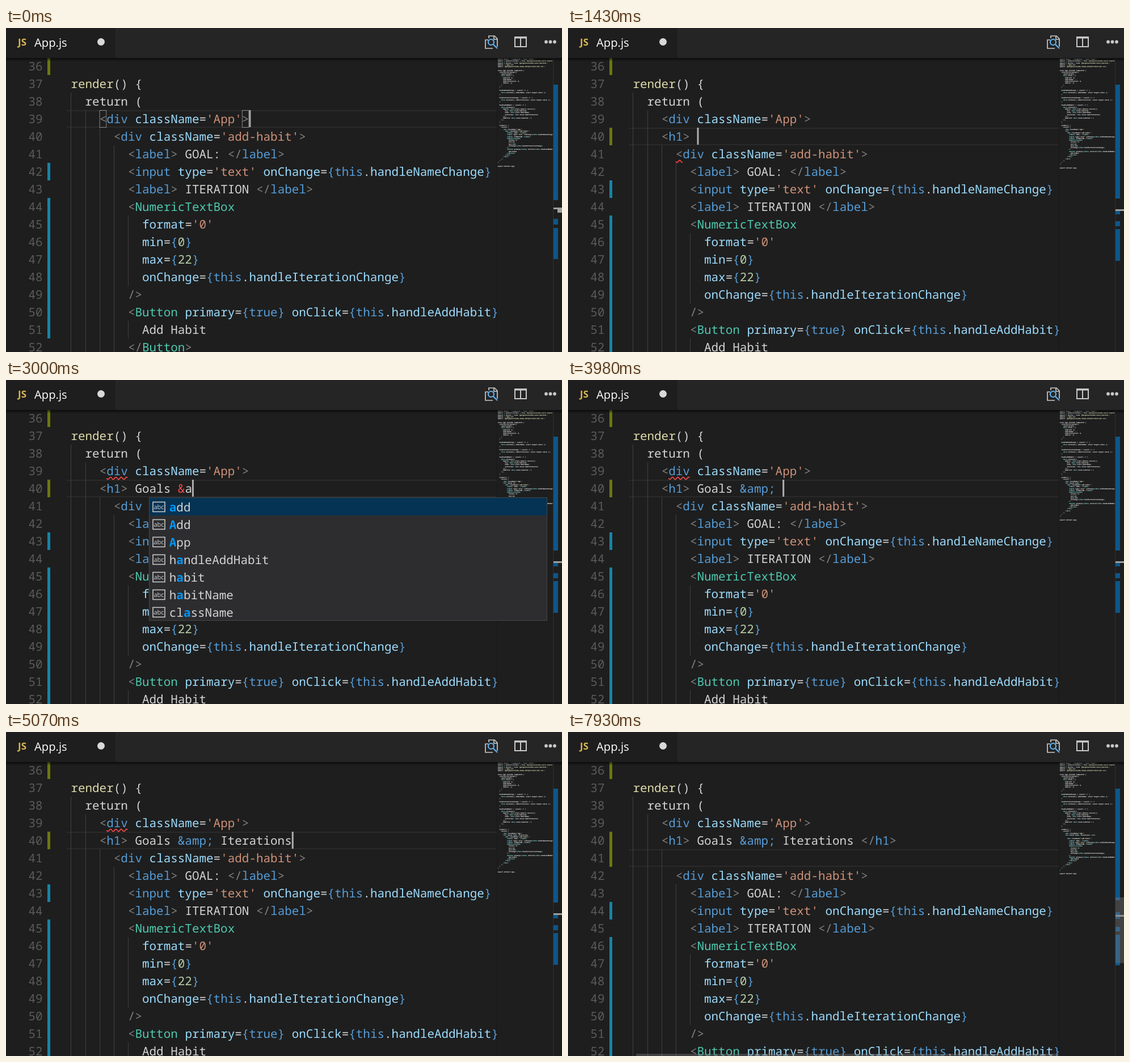
An HTML page that plays this animation: 980x572 px, repeating every 8000 ms.

```html
<!DOCTYPE html>
<html lang="en">
<head>
<meta charset="utf-8">
<title>App.js</title>
<style>
  html, body { margin: 0; width: 100%; height: 100%; overflow: hidden; background: #1e1e1e; }
  svg { display: block; width: 980px; height: 572px; }
  text { text-rendering: geometricPrecision; white-space: pre; }
  .mono { font-family: "Noto Sans Mono", monospace; }
  .ui { font-family: "Open Sans", sans-serif; }
  #map { filter: brightness(1.8); }
</style>
</head>
<body>
<svg viewBox="0 0 980 572">
  <defs>
    <clipPath id="codeClip"><rect x="107" y="53" width="759" height="519"/></clipPath>
    <clipPath id="mapClip"><rect x="866" y="53" width="98" height="519"/></clipPath>
    <linearGradient id="shade" x2="0" y2="1">
      <stop stop-color="#000" stop-opacity=".6"/><stop offset="1" stop-color="#000" stop-opacity="0"/>
    </linearGradient>
  </defs>
  <rect width="980" height="572" fill="#1e1e1e"/>
  <g id="gutter" class="mono"></g>
  <g id="code" class="mono" clip-path="url(#codeClip)"></g>
  <g id="map" class="mono" clip-path="url(#mapClip)" font-weight="800"></g>
  <g id="ruler"></g>
  <g id="popup" class="mono"></g>
  <g id="header">
    <rect width="980" height="53" fill="#252526"/>
    <rect width="193" height="53" fill="#1e1e1e"/>
    <rect y="53" width="980" height="6" fill="url(#shade)"/>
    <text class="ui" x="21" y="30.5" font-size="17" font-weight="700" fill="#d8b650">JS</text>
    <text class="ui" x="50" y="33" font-size="20.2" fill="#fff">App.js</text>
    <circle cx="167.5" cy="24.5" r="6.5" fill="#d8d8d8"/>
    <g fill="none" stroke="#c8c8c8" stroke-width="1.7">
      <path d="M851 18V14H861L866 19V33M850 21H845V36H858M860 14V20H866"/>
      <g stroke="#5fb4ee" stroke-width="2.2"><circle cx="855" cy="25" r="5"/><path d="M859 29L866 36"/></g>
      <path d="M897 16H917V33H897ZM907 16V33M896 17.5H918" stroke-width="2"/>
    </g>
    <g fill="#c8c8c8"><circle cx="952" cy="24.5" r="2.9"/><circle cx="959.5" cy="24.5" r="2.9"/><circle cx="967" cy="24.5" r="2.9"/></g>
  </g>
</svg>
<script>
const LOOP = 8000, LEFT = 89.3, ADV = 12.56, SIZE = ADV / 0.6, ROW = 31, TOP = 52, FIRST = 36;
const $ = id => document.getElementById(id);
const colX = c => LEFT + c * ADV;
const rowY = r => TOP + r * ROW;
const esc = s => s.replace(/&/g, '&amp;').replace(/</g, '&lt;');
const rect = (x, y, w, h, fill, more = '') =>
  `<rect x="${x}" y="${y}" width="${w}" height="${h}" fill="${fill}" ${more}/>`;

const FILE = `import React, { Component } from 'react';
import { NumericTextBox } from '@progress/kendo-react-inputs';
import { Button } from '@progress/kendo-react-buttons';
import './App.css'
import '@progress/kendo-theme-default/dist/all.css';

class App extends Component {
  constructor(props){
    super(props);
    this.state = {
      habitId: 0,
      habitName: '',
      habitIteration: 0,
      habits: []
    }
  }

  handleNameChange = (event) => {
    this.setState({ habitName: event.target.value });
  }

  handleIterationChange = (event) => {
    this.setState({ habitIteration: event.target.value });
  }

  handleAddHabit = (event) => {
    this.setState({
      habits: this.state.habits.concat([{
        key: this.state.habitId,
        name: this.state.habitName,
        iteration: this.state.habitIteration
      }]),
      habitId: this.state.habitId + 1
    });
  }

  render() {
    return (
      <div className='App'>
        <div className='add-habit'>
          <label> GOAL: </label>
          <input type='text' onChange={this.handleNameChange} />
          <label> ITERATION </label>
          <NumericTextBox
            format='0'
            min={0}
            max={22}
            onChange={this.handleIterationChange}
          />
          <Button primary={true} onClick={this.handleAddHabit}>
            Add Habit
          </Button>
        </div>
      </div>
    );
  }
}

export default App;`.split('\n');

// Syntax colours, first match wins
const RULES = [
  [/'[^']*'/, '#ce9178'],
  [/<\/\w*$/, '#d4d4d4'],
  [/(?<=<\/?)[a-z]\w*/, '#569cd6'],
  [/(?<=<\/?)[A-Z]\w*/, '#4ec9b0'],
  [/<\/?|\/?>/, '#808080'],
  [/\w+(?==['{])|(?<=this\.)\w+/, '#9cdcfe'],
  [/\{$/, '#d4d4d4'],
  [/\bthis\b|\btrue\b|&amp;|[{}]/, '#569cd6'],
  [/&/, '#f44747'],
  [/\b\d+/, '#b5cea8'],
  [/\w+(?=\()/, '#dcdcaa'],
  [/\w+|\S/, '#d4d4d4']
];
const LEXER = new RegExp(RULES.map(r => `(${r[0].source})`).join('|'), 'g');

function paint(line, x, y, adv) {
  const spans = [...line.matchAll(LEXER)].map(m => {
    const rule = m.slice(1).findIndex(Boolean);
    return `<tspan x="${(x + m.index * adv).toFixed(2)}" fill="${RULES[rule][1]}">${esc(m[0])}</tspan>`;
  });
  return `<text y="${y}" font-size="${adv / 0.6}">${spans.join('')}</text>`;
}

function squiggle([row, from, to]) {
  const x0 = colX(from), x1 = colX(to), y = rowY(row) + 28.5;
  let d = '';
  for (let x = x0; x <= x1; x++)
    d += `${d ? 'L' : 'M'}${x.toFixed(1)} ${(y + 2 * Math.sin((x - x0) * Math.PI / 4.7)).toFixed(1)}`;
  return `<path d="${d}" fill="none" stroke="#f44747" stroke-width="1.7"/>`;
}

// Suggestion lists: query, items, icon
const list = (query, items, icon = 'abc') => ({ query, items: items.split(','), icon });
const TAGS = list('h', 'h,h1,h2,h3,h4,h5,h6,handleAddHabit,handleIterationChange,handleNameChange,head,header,hr', 'cube');
const ITE = 'iteration,ITERATION,habitIteration,handleIterationChange';
const special = { 'h': 'page', 'import statement': 'snip' };

const ICONS = {
  cube: `<path d="M-11 -4L0 -9L11 -5V4L-1 9L-11 5Z" fill="#75beff"/><path d="M-8 -3.5L0 -6.8L8 -4.2L-1 -.6Z" fill="#2d2d30"/>`,
  page: `<path d="M-7 -10H2L8 -4V10H-7ZM2 -10V-4H8" fill="none" stroke="#c8c8c8" stroke-width="1.8"/>`,
  abc: `<rect x="-10" y="-8.5" width="21" height="17" fill="none" stroke="#c8c8c8" stroke-width="1.6"/>
    <text x=".5" y="4" font-size="11" text-anchor="middle" fill="#d4d4d4" class="ui">abc</text>`,
  snip: `<path d="M-8 8V-9H9V8" fill="none" stroke="#c8c8c8" stroke-width="2"/><path d="M-9 10H10" stroke="#c8c8c8" stroke-width="2" stroke-dasharray="2.5 2.2"/>`
};

function hits(label, query) {
  const low = label.toLowerCase(), q = query.toLowerCase(), at = low.indexOf(q);
  const start = at < 0 ? low.indexOf(q.slice(1), 1) : at;
  return [...label].map((_, i) =>
    at < 0 ? i === 0 || (i >= start && i < start + q.length - 1) : i >= at && i < at + q.length);
}

function drawPopup(pop, cursor) {
  if (!pop) return '';
  const x = Math.min(Math.round(colX(cursor)), 252), y = 207, h = pop.items.length * ROW + 1;
  let out = rect(x + .5, y + .5, 701, h - 1, '#2d2d30', 'stroke="#454545"');
  out += rect(x + 1, y + 1, 700, ROW, '#053354');
  pop.items.forEach((label, i) => {
    const mid = y + 17 + i * ROW, hit = hits(label, pop.query);
    const spans = [...label].map((c, k) =>
      `<tspan x="${(x + 35.8 + k * ADV).toFixed(2)}" ${hit[k] ? 'fill="#0097fb" font-weight="700"' : ''}>${c}</tspan>`);
    out += `<g transform="translate(${x + 17} ${mid})">${ICONS[special[label] || pop.icon]}</g>`;
    out += `<text y="${mid + 7.5}" font-size="${SIZE}" fill="#d4d4d4">${spans.join('')}</text>`;
  });
  if (pop.items.length > 11) out += rect(x + 684, y + 1, 17, 37, '#797979', 'opacity=".4"');
  return out;
}

// Steps: time, typed line, extras (bars is the scrollbar opacity)
const H = '      ', BLANK = H + '  ';
const OPEN = [[5, 8, 9]], DIV = [[3, 7, 10]];
const G = H + '<h1> Goals', A = G + ' &amp;', I = A + ' Iterations';
const END = I + ' </h1>';
const STEPS = [
  [0, null, {}],
  [150, BLANK, { bars: .4 }],
  [300, H, { bars: .4 }],
  [460, H + '<', { bars: .4 }],
  [610, H + '<h', { bars: .3 }],
  [770, H + '<h', { bars: .2, pop: TAGS, wavy: OPEN }],
  [920, H + '<h1', { bars: .14, pop: TAGS, wavy: OPEN }],
  [1070, H + '<h1', { bars: .06, pop: list('h1', 'h1', 'cube'), wavy: OPEN }],
  [1260, H + '<h1>', { wavy: OPEN }],
  [1420, H + '<h1> ', { wavy: OPEN }],
  [1580, H + '<h1> G', { wavy: OPEN, pop: list('G', 'GOAL,target,getChildContext,global,change,handleNameChange,handleIterationChange,onChange,progress,getElement,getValue,group') }],
  [1730, H + '<h1> Go', { wavy: OPEN, pop: list('Go', 'GOAL') }],
  [1890, H + '<h1> Goal', { wavy: OPEN, pop: list('Goal', 'GOAL') }],
  [2210, G, { wavy: OPEN }],
  [2370, G + ' ', { wavy: DIV }],
  [2520, G + ' &', { wavy: DIV }],
  [3000, G + ' &a', { wavy: DIV, pop: list('a', 'add,Add,App,handleAddHabit,habit,habitName,className') }],
  [3180, G + ' &am', { wavy: DIV, pop: list('am', 'name,habitName,className,handleNameChange') }],
  [3360, G + ' &amp', { wavy: DIV }],
  [3690, A, { wavy: DIV }],
  [3980, A + ' ', { wavy: DIV }],
  [4150, A + ' I', { wavy: DIV, pop: list('I', 'iteration,ITERATION,import,import statement,input,if,ifelse,Id,habitId,habitIteration,handleIterationChange') }],
  [4300, A + ' It', { wavy: DIV, pop: list('It', ITE + ',habit,habits,import statement') }],
  [4440, A + ' Ite', { wavy: DIV, pop: list('Ite', ITE + ',import statement') }],
  [4600, A + ' Iter', { wavy: DIV, pop: list('Iter', ITE) }],
  [4750, A + ' Iterat', { wavy: DIV, pop: list('Iterat', ITE) }],
  [4910, A + ' Iteratio', { wavy: DIV, pop: list('Iteratio', ITE) }],
  [5070, I, { wavy: DIV }],
  [5550, I + ' ', { wavy: DIV }],
  [5860, I + ' <', { wavy: DIV }],
  [6030, I + ' </', { wavy: DIV }],
  [6340, I + ' </h', { wavy: [[5, 1.4, 9], [4, 34, 37]], pop: list('h', 'h1') }],
  [6500, I + ' </h1', { wavy: [[5, 1.4, 9], [4, 34, 38]], pop: list('h1', 'h1') }],
  [6810, I + ' </h1', { wavy: OPEN, pop: list('h1', 'h1') }],
  [6950, I + ' </h1', { wavy: OPEN, pop: list('h1', 'h1'), blink: 1 }],
  [7300, END, {}],
  [7460, END, { extra: 1, bars: .4 }],
  [7930, END, { extra: 1, bars: .4, blink: 1 }]
];

// Overview marks for 0, 1 and 2 added lines
const MARKS = [
  [[100, 304], [337, 347], [353, 408]],
  [[100, 301], [322, 329], [341, 350], [355, 411]],
  [[100, 297], [318, 330], [344, 352], [358, 412]]
];

function draw([, typed, { pop, wavy = [], bars, blink, extra }]) {
  const added = typed === null ? [] : extra ? [typed, BLANK] : [typed];
  const n = added.length, row = 3 + n;
  const lines = [...FILE.slice(0, 39), ...added, ...FILE.slice(39)];
  const cursor = n ? added[n - 1].length : 27;

  let gutter = '', code = '';
  const mark = (from, to, fill) => gutter += rect(73, rowY(from - FIRST), 5, (to - from + 1) * ROW, fill);
  mark(36, 36, '#6b7710');
  if (n) mark(40, 39 + n, '#6b7710');
  mark(42 + n, 42 + n, '#1883a5');
  mark(44 + n, 51 + n, '#1883a5');

  code += rect(107, rowY(row), 759, 2, '#2a2a2a') + rect(107, rowY(row) + 29, 759, 2, '#2a2a2a');
  for (let r = 0; r < 17; r++) {
    const line = lines[FIRST - 1 + r], base = rowY(r) + 22.7;
    gutter += `<text x="64.5" y="${base}" font-size="${SIZE}" text-anchor="end" fill="#5a5a5a">${FIRST + r}</text>`;
    const indent = line.match(/^ */)[0].length;
    for (let c = 2; c < indent; c += 2) code += rect(Math.round(colX(c)), rowY(r), 1, ROW, '#404040');
    code += paint(line, LEFT, base, ADV);
  }
  if (n && typed.endsWith('<h1'))
    code += `<text x="${colX(8)}" y="${rowY(5) + 22.7}" font-size="${SIZE}" fill="#f44747">&lt;</text>`;
  if (!n) for (const c of [6, 26])
    code += rect(colX(c) + .5, rowY(3) + .5, ADV - 1, 30, 'none', 'stroke="#888"');
  code += wavy.map(squiggle).join('');
  if (!blink) code += rect(colX(cursor), rowY(row), 3, ROW - 1, '#aeafad');
  if (bars) code += rect(120, 568, 746, 4, '#797979', `opacity="${bars}"`);

  let ruler = rect(865, 53, 1, 519, '#181818') + rect(964, 53, 1, 519, '#303030');
  for (const [a, b] of MARKS[n]) ruler += rect(965, a, 8, b - a, '#0e568a');
  ruler += rect(965, 317 + 3 * n, 15, 3, '#a0a0a0');
  if (!n) ruler += rect(972, 317, 8, 9, '#a0a0a0');
  if (bars) ruler += rect(965, 298 - 3 * n, 15, 116, '#797979', `opacity="${bars}"`);

  $('gutter').innerHTML = gutter;
  $('code').innerHTML = code;
  $('map').innerHTML = lines.map((l, i) => paint(l, 866.5, 56.2 + i * 3.25, 1.62)).join('');
  $('ruler').innerHTML = ruler;
  $('popup').innerHTML = drawPopup(pop, cursor);
}

const start = performance.now();
let shown;
function tick() {
  const t = Math.max(0, performance.now() - start) % LOOP;
  const step = STEPS.findLast(s => s[0] <= t);
  if (step !== shown) draw(shown = step);
  requestAnimationFrame(tick);
}
tick();
</script>
</body>
</html>
```
